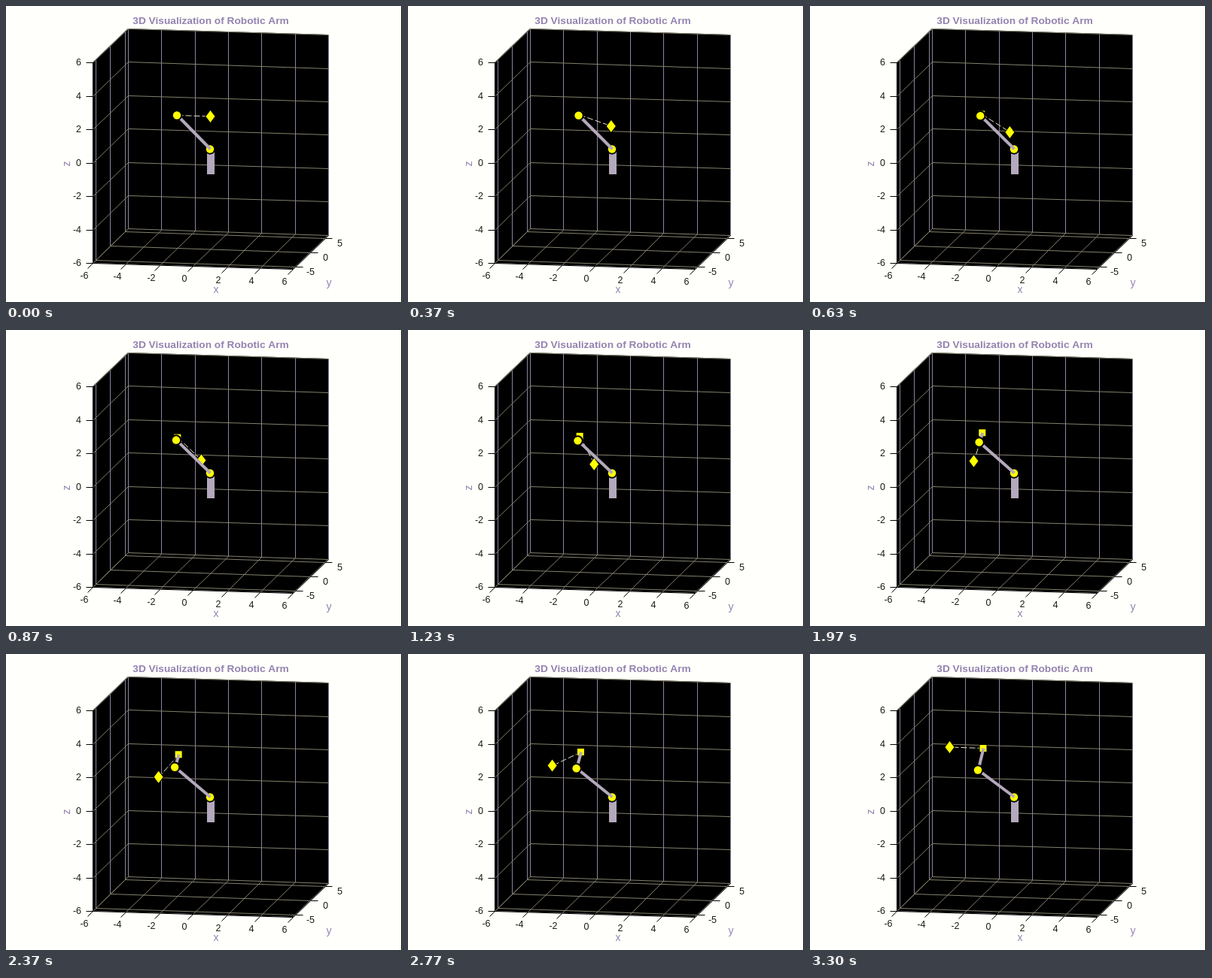
Animation, 526 px wide and 394 px high, one loop 3.33 s. Source, as an HTML page with a canvas:

```html
<!DOCTYPE html>
<html lang="en">
<head>
<meta charset="utf-8">
<title>3D Visualization of Robotic Arm</title>
<style>
  html, body { margin: 0; overflow: hidden; background: #fffffb; }
  canvas { display: block; }
</style>
</head>
<body>
<canvas id="stage" width="526" height="394"></canvas>
<script>
const ctx = document.getElementById('stage').getContext('2d');
const LOOP = 3330, STEPS = 100, STEP = 100 / 3;
const PAPER = '#fffffb', YELLOW = '#ffff00', METAL = '#b4a9bc', TITLE = '#9482b0';
const GRID_UP = '#8a84a0', GRID_FLAT = '#84806c', INK = '#1c1c14';
const FONT = '"Liberation Sans", Arial, sans-serif';

const project = (x, y, z) => [
  Math.round(115 + (x + 6) * 22.2 + (y + 6) * 3.9),
  Math.round(342 + (x + 6) * 0.7 - (y + 6) * 3.8 - (z + 6) * 22.22)
];

function line(color, width, ...points) {
  ctx.strokeStyle = color;
  ctx.lineWidth = width;
  ctx.beginPath();
  points.forEach(([x, y]) => ctx.lineTo(x + 0.5, y + 0.5));
  ctx.stroke();
}

function marker(edge, trace) {
  ctx.beginPath();
  trace();
  ctx.closePath();
  ctx.fillStyle = YELLOW;
  ctx.strokeStyle = '#000';
  ctx.lineWidth = edge;
  ctx.stroke();
  ctx.fill();
}

const joint = (x, y) => marker(4, () => ctx.arc(x, y + 0.5, 5.2, 0, 7));
const block = (x, y) => marker(2, () => ctx.rect(x - 4.5, y - 4, 9, 9));
const diamond = (x, y) => marker(2, () => {
  ctx.moveTo(x, y - 7.5);
  ctx.lineTo(x + 6, y + 0.5);
  ctx.lineTo(x, y + 8.5);
  ctx.lineTo(x - 6, y + 0.5);
});

function label(text, x, y, { align = 'center', color = INK, font = '12.5px' } = {}) {
  ctx.font = `${font} ${FONT}`;
  ctx.textAlign = align;
  ctx.fillStyle = color;
  ctx.fillText(text, x, y);
}

function drawAxes() {
  ctx.fillStyle = PAPER;
  ctx.fillRect(0, 0, 526, 394);
  ctx.fillStyle = '#000';
  ctx.fillRect(525, 0, 1, 394);

  const outline = [project(-6, -6, -6), project(-6, -6, 6), project(-6, 6, 6),
                   project(6, 6, 6), project(6, 6, -6), project(6, -6, -6)];
  ctx.beginPath();
  outline.forEach(p => ctx.lineTo(...p));
  ctx.fill();

  for (const y of [-5, 0, 5]) {
    line(GRID_UP, 1, project(-6, y, -6), project(-6, y, 6));
    line(GRID_FLAT, 1, project(-6, y, -6), project(6, y, -6));
    const [px, py] = project(6, y, -6);
    line('#000', 1, [px, py], [px + 9, py]);
    label(y, px + 19.5, py + 10.5);
  }
  for (let v = -6; v <= 6; v += 2) {
    line(GRID_FLAT, 1, project(-6, -6, v), project(-6, 6, v), project(6, 6, v));
    line(GRID_FLAT, 1, project(v, -6, -6), project(v, 6, -6));
    line(GRID_UP, 1, project(v, 6, -6), project(v, 6, 6));
    const [zx, zy] = project(-6, -6, v), [xx, xy] = project(v, -6, -6);
    line('#000', 1, [zx, zy], [zx - 9, zy]);
    line('#000', 1, [xx, xy], [xx - 7, xy + 7]);
    label(v, 100, zy + 4, { align: 'right' });
    label(v, xx - 11, xy + 20.5);
  }
  line('#000', 1, project(-6, -6, 6), project(-6, -6, -6), project(6, -6, -6), project(6, 6, -6));

  const axisName = { color: TITLE, font: '14px' };
  label('3D Visualization of Robotic Arm', 272, 24, { color: TITLE, font: 'bold 13.7px' });
  label('x', 279, 382, axisName);
  label('y', 429, 373, axisName);
  ctx.save();
  ctx.translate(85, 210);
  ctx.rotate(-Math.PI / 2);
  label('z', 0, 0, axisName);
  ctx.restore();
}

// u runs from 0 to 1; the tool makes half a turn while both links slowly lift
function drawArm(u) {
  const lift = u ** 1.6, turn = Math.PI * u;
  const cos = Math.cos(turn), sin = Math.sin(turn);
  const shoulder = [271, 190];
  const elbow = [227 - 4 * u, 145 + 9 * lift];
  const wrist = [elbow[0] + 7 * u, elbow[1] - 29 * lift];
  const tool = [wrist[0] + 44.5 * cos + 2 * sin, wrist[1] + 40 * sin + 1.5 * cos];

  ctx.setLineDash([8, 3]);
  line('#e6e0c8', 1, wrist, tool);
  ctx.setLineDash([]);
  diamond(...tool);
  block(...wrist);
  line(METAL, 4, elbow, wrist);
  ctx.fillStyle = METAL;
  ctx.fillRect(267, 190, 10, 34);
  joint(...shoulder);
  line(METAL, 4, shoulder, elbow);
  joint(...elbow);
}

function frame(now) {
  const index = Math.floor((now % LOOP + 5) / STEP) % STEPS;
  drawAxes();
  drawArm(index / (STEPS - 1));
  requestAnimationFrame(frame);
}
requestAnimationFrame(frame);
</script>
</body>
</html>
```
